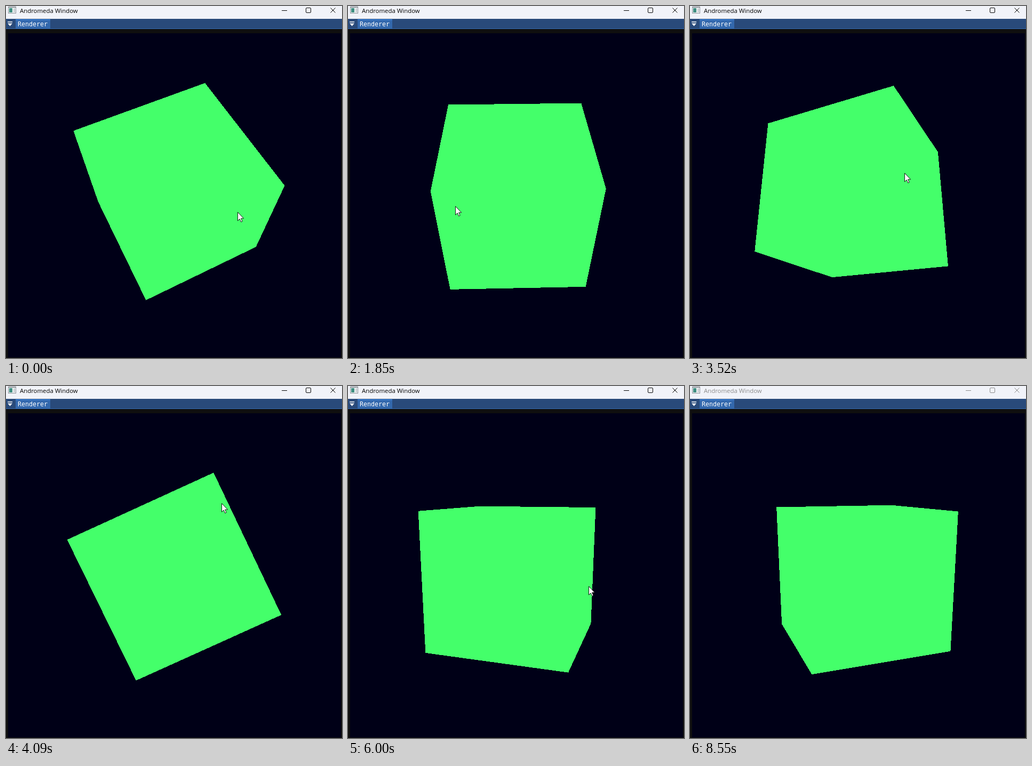
An HTML page that plays this animation: 630 by 658 pixels, repeating every 8.58 s.

```html
<!DOCTYPE html>
<html lang="en">
<head>
<meta charset="utf-8">
<title>Renderer</title>
<style>
  html, body { margin: 0; width: 100%; height: 100%; overflow: hidden; background: #0f0f0f; }
  svg { display: block; width: 630px; height: 658px; }
  .title { font: 11.4px "Open Sans", "Noto Sans", sans-serif; }
  .tab { font: 11.63px "DejaVu Sans Mono", monospace; fill: #fff; }
</style>
</head>
<body>
<svg viewBox="0 0 630 658">
  <rect width="630" height="24" fill="#f1f3f9"/>
  <g shape-rendering="crispEdges">
    <rect x="4" y="1" width="15" height="13" fill="#8a9097"/>
    <rect x="5" y="3" width="13" height="10" fill="#f4f6f8"/>
    <rect x="6" y="4" width="6" height="8" fill="#3f8f82"/>
    <rect x="14" y="4" width="3" height="8" fill="#c9ced3"/>
  </g>
  <g id="chrome">
    <text class="title" x="26" y="13" fill="currentColor">Andromeda Window</text>
    <path d="M517 8.5h10M608.5 3.5l9 9m0-9l-9 9" fill="none" stroke="currentColor"/>
    <rect x="562.5" y="3.5" width="9" height="9" rx="1.5" fill="none" stroke="currentColor"/>
  </g>

  <g shape-rendering="crispEdges">
    <rect y="24" width="630" height="19" fill="#294a7a"/>
    <rect y="42" width="630" height="1" fill="#3368ad"/>
    <rect x="18" y="25" width="65" height="18" fill="#3368ad"/>
    <rect x="18" y="25" width="65" height="1" fill="#4296fa"/>
    <rect x="4" y="51" width="624" height="606" fill="#000017"/>
  </g>
  <path d="M3 29h9v1.5h-9zM3 32.5h9l-4.5 5z" fill="#fff"/>
  <text class="tab" x="22" y="38">Renderer</text>

  <g id="cube" fill="#44ff6a" shape-rendering="crispEdges"></g>
  <path id="cursor" d="M.5 .5v16l3.7-3.5 2.4 5.7 2.5-1.1-2.4-5.5h4.9z" fill="#fff" stroke="#000" stroke-width=".9"/>
</svg>
<script>
const LOOP = 8580;

// The drag: cursor position and cube angles (degrees) at its main turns
const DRAG = [
  { t: 0, x: 434, y: 385, yaw: -26.9, pitch: 60 },
  { t: 1250, x: 68, y: 345, yaw: 125, pitch: 50 },
  { t: 1850, x: 201, y: 374, yaw: 88.7, pitch: 42.6 },
  { t: 2850, x: 394, y: 430, yaw: 31.2, pitch: 61.3 },
  { t: 4090, x: 404, y: 219, yaw: 25.1, pitch: -88.3 },
  { t: 4700, x: 273, y: 337, yaw: 64.2, pitch: -42 },
  { t: 5180, x: 538, y: 568, yaw: -14, pitch: 30 },
  { t: 6000, x: 451, y: 374, yaw: 18.1, pitch: 11.9 },
  { t: 6760, x: 307, y: 363, yaw: 69, pitch: 12.7 }
];
const REST = DRAG[DRAG.length - 1];

// Corner index bits are x, y, z; each face is a ring of four corners.
const FACES = [1, 2, 4].flatMap(axis => [0, axis].map(side => {
  const u = axis * 2 % 7, v = axis * 4 % 7;
  return [0, u, u + v, v].map(corner => corner + side);
}));

const chrome = document.getElementById("chrome");
const cursor = document.getElementById("cursor");
const cube = document.getElementById("cube");
const polygons = FACES.map(() =>
  cube.appendChild(document.createElementNS("http://www.w3.org/2000/svg", "polygon")));

const progress = (t, from, to) => Math.min(1, Math.max(0, (t - from) / (to - from)));
const smooth = u => u * u * (3 - 2 * u);
const radians = degrees => degrees * Math.PI / 180;

// Tangent of a monotone curve: flat at turning points and at the ends
function slope(i, name) {
  const [a, b, c] = [DRAG[i - 1], DRAG[i], DRAG[i + 1]];
  if (!a || !c) return 0;
  const before = (b[name] - a[name]) / (b.t - a.t);
  const after = (c[name] - b[name]) / (c.t - b.t);
  return before * after > 0 ? 2 * before * after / (before + after) : 0;
}

function sample(t, name) {
  if (t >= REST.t) return REST[name];
  const i = DRAG.findIndex(key => key.t > t) - 1;
  const a = DRAG[i], b = DRAG[i + 1], span = b.t - a.t;
  const u = (t - a.t) / span, v = 1 - u;
  return v * v * ((1 + 2 * u) * a[name] + u * span * slope(i, name))
       + u * u * ((1 + 2 * v) * b[name] - v * span * slope(i + 1, name));
}

// Perspective view of a unit cube from distance 3
function project(corner, yaw, pitch) {
  const [x, y, z] = [1, 2, 4].map(bit => corner & bit ? 0.5 : -0.5);
  const side = x * Math.cos(yaw) - z * Math.sin(yaw);
  const front = x * Math.sin(yaw) + z * Math.cos(yaw);
  const up = y * Math.cos(pitch) - front * Math.sin(pitch);
  const depth = 3 - y * Math.sin(pitch) - front * Math.cos(pitch);
  return [316 + 755 * side / depth, 353.5 - 731 * up / depth];
}

function drawCube(t) {
  const yaw = radians(sample(t, "yaw")), pitch = radians(sample(t, "pitch"));
  FACES.forEach((face, i) => polygons[i].setAttribute("points",
    face.map(corner => project(corner, yaw, pitch)).join(" ")));
}

function drawCursor(t) {
  const leave = smooth(progress(t, 7290, 7700));
  const x = sample(t, "x") + 100 * leave;
  const y = sample(t, "y") - 387 * leave;
  cursor.setAttribute("transform", `translate(${Math.round(x)} ${Math.round(y)})`);
}

function draw(now) {
  const t = now % LOOP;
  drawCube(t);
  drawCursor(t);
  const grey = Math.round(140 * progress(t, 8490, 8550));
  chrome.style.color = `rgb(${grey},${grey},${grey})`;
  requestAnimationFrame(draw);
}
requestAnimationFrame(draw);
</script>
</body>
</html>
```
